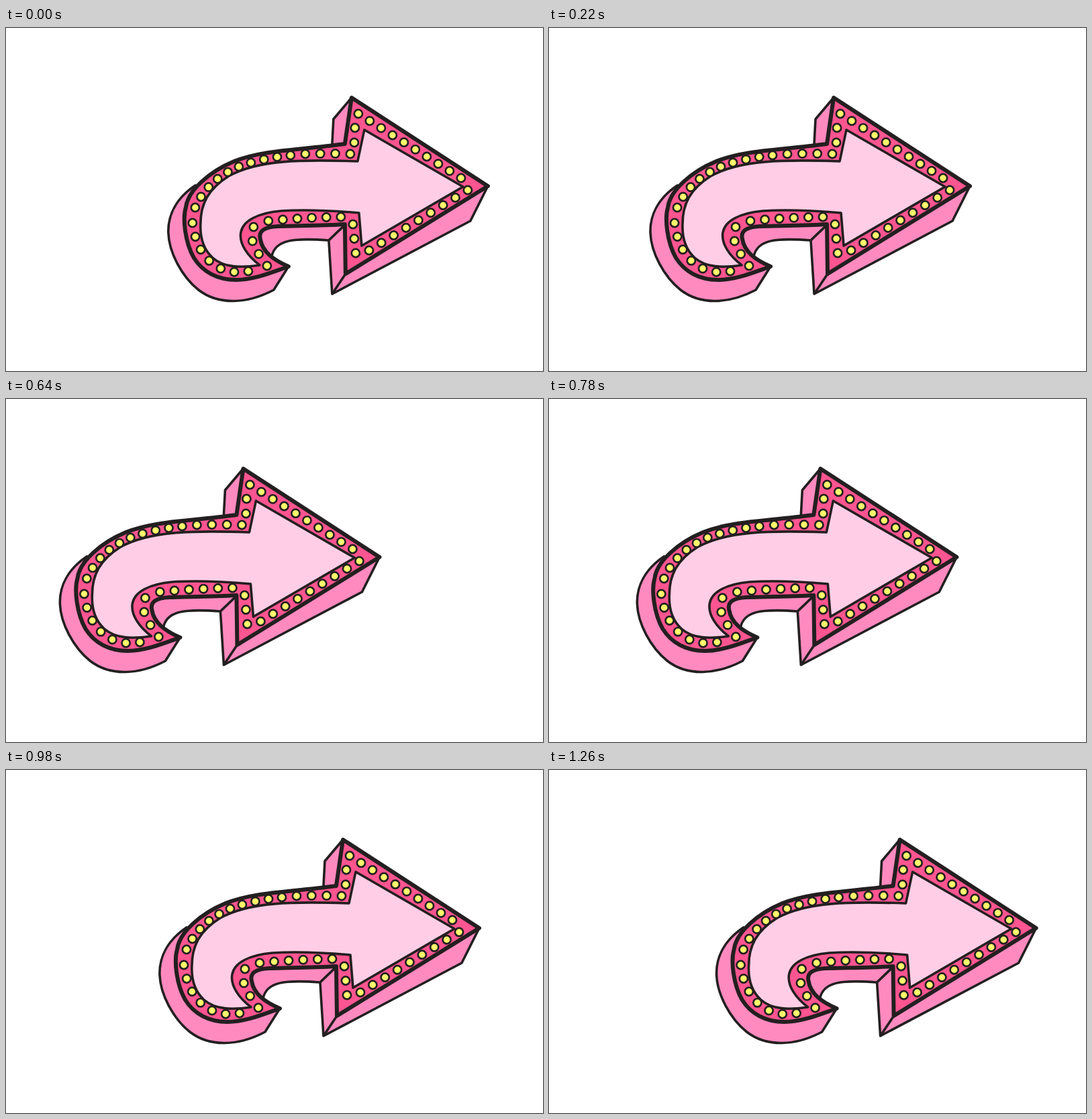
Write an HTML page that moves like this. It is 800 by 512 pixels and loops after 1280 ms.

```html
<!DOCTYPE html>
<html lang="en">
<head>
<meta charset="utf-8">
<title>Marquee arrow</title>
<style>
  html, body { margin: 0; width: 100%; height: 100%; overflow: hidden; background: #fff; }
  svg { display: block; width: 800px; height: 512px; }
  path, circle { stroke: #231f20; stroke-width: 3.6; stroke-linejoin: round; }
  .side { fill: #ff8abf; }
  .face { fill: #ff5590; stroke-width: 6; }
  .panel { fill: #ffcee6; }
  circle { fill: #fff86c; stroke-width: 2.7; }
</style>
</head>
<body>
<svg viewBox="0 0 800 512">
  <g id="arrow">
    <g class="side">
      <path d="M282 235C254 254 241 279 242 306C243 335 262 371 287 391C317 414 359 412 399 391L421 356L340 330Z"/>
      <path d="M515 104L488 136L486 173L506 180Z"/>
      <path d="M396 341C401 316 428 313 481 317L506 293L378 296L372 330Z"/>
      <path d="M506 293L481 317L486 397L692 288L718 236L506 367Z"/>
      <path d="M486 397L506 367"/>
    </g>
    <path class="face" d="M515 104L718 236L506 367L505 293C470 295 440 295 405 296C385 297 376 303 379 315C382 334 398 346 421 356C395 365 370 376 343 376C315 376 293 364 280 343C267 320 263 285 268 268C271 242 304 214 340 199C383 182 430 183 505 173Z"/>
    <path class="panel" d="M534 152L681 237L530 325L526 276C480 272 440 271 410 273C375 276 353 288 350 305C347 322 360 340 378 354C350 358 325 358 308 343C293 329 289 312 290 292C290 262 302 240 332 221C375 197 440 196 524 199Z"/>
  </g>
</svg>
<script>
const SVG = 'http://www.w3.org/2000/svg';
const arrow = document.getElementById('arrow');

// Spreads bulbs evenly along a curve, including both ends
function addBulbs(count, d) {
  const rail = document.createElementNS(SVG, 'path');
  rail.setAttribute('d', d);
  const gap = rail.getTotalLength() / (count - 1);
  for (let i = 0; i < count; i++) {
    const { x, y } = rail.getPointAtLength(i * gap);
    const bulb = document.createElementNS(SVG, 'circle');
    bulb.setAttribute('r', 6.1);
    bulb.setAttribute('cx', x);
    bulb.setAttribute('cy', y);
    arrow.append(bulb);
  }
}

addBulbs(10, 'M525 128L678 224');
addBulbs(9, 'M688 242L541 332');
addBulbs(3, 'M521 336L517 293');
addBulbs(6, 'M499 282Q440 283 391 288');
addBulbs(4, 'M369 297C361 317 372 331 389 355');
addBulbs(7, 'M361 363C318 371 285 345 278 291');
addBulbs(6, 'M282 268Q300 227 347 207');
addBulbs(4, 'M365 201Q393 193 424 190');
addBulbs(4, 'M446 188Q480 187 513 188');
addBulbs(2, 'M519 171L520 149');

const LOOP = 1280, STEP = 20, HELD = [20, 420], FIRST = 16;
const LEFT = -176, RIGHT = 16;
const TURN = 516, ARRIVE = 1156, LEAVE = 1167;

const easeInOut = u => u < .5 ? 2 * u * u : 1 - 2 * (1 - u) ** 2;

function glide(from, to, t, start, end) {
  const u = Math.min(1, (t - start) / (end - start));
  return from + (to - from) * easeInOut(u);
}

function offset(t) {
  if (t < TURN) return glide(RIGHT, LEFT, t, LEAVE - LOOP, TURN);
  if (t < LEAVE) return glide(LEFT, RIGHT, t, TURN, ARRIVE);
  return glide(RIGHT, LEFT, t, LEAVE, TURN + LOOP);
}

function draw(now) {
  let t = Math.floor(now % LOOP / STEP) * STEP;
  if (HELD.includes(t)) t -= STEP;
  arrow.setAttribute('transform', `translate(${offset(Math.max(t, FIRST))})`);
  requestAnimationFrame(draw);
}

draw(0);
</script>
</body>
</html>
```
